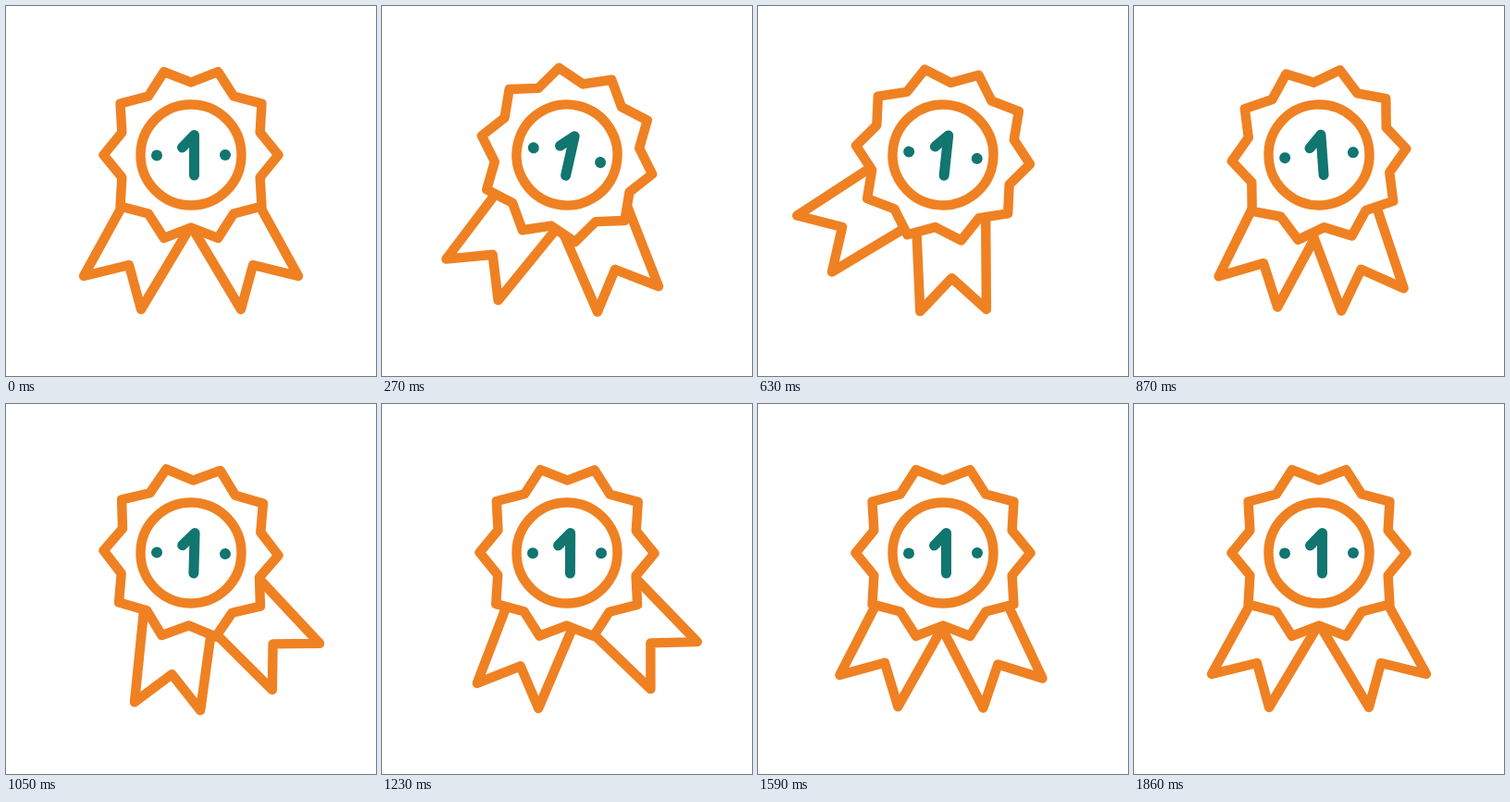
Recreate the animation shown at these times as an HTML page. Size 400 by 400 pixels, loop 2.93 s.

```html
<!DOCTYPE html>
<html lang="en">
<head>
<meta charset="utf-8">
<title>First place rosette</title>
<style>
  html, body { margin: 0; width: 100%; height: 100%; overflow: hidden; background: #fff; }
  svg { display: block; width: 100%; height: 100%; }
</style>
</head>
<body>
<svg viewBox="0 0 400 400">
  <g fill="#fff" stroke="#ef8122" stroke-width="10.400" stroke-linecap="round" stroke-linejoin="round">
    <path id="left" d="M145 181L84 292L133 280L146 328L207 226"/>
    <path id="right" d="M255 181L316 292L267 280L254 328L193 226"/>
    <g id="badge">
      <path id="star"/>
      <circle cx="200" cy="161" r="54.5"/>
      <path d="M190.500 153L203.500 139.500V183" fill="none" stroke="#117570" stroke-width="11"/>
      <g fill="#117570" stroke="none">
        <circle cx="163" cy="161.500" r="6"/>
        <circle cx="237" cy="161" r="6"/>
      </g>
    </g>
  </g>
</svg>
<script>
const LOOP = 2930, STEP = 30, REST = 1860;
const CX = 200, CY = 161;
const $ = id => document.getElementById(id);

// A pendulum: cosine easing from one turning point [time, degrees] to the next.
const swing = (...turns) => t => {
  const i = turns.findIndex(([time]) => time > t);
  if (i < 0) return turns[turns.length - 1][1];
  const [t0, a0] = i ? turns[i - 1] : [0, 0];
  const [t1, a1] = turns[i];
  return a0 + (a1 - a0) * (1 - Math.cos(Math.PI * (t - t0) / (t1 - t0))) / 2;
};

const spin = swing([390, 16.2], [870, -4.1], [1060, 1.6], [1300, 0]);
const leftSwing = swing([60, -1.7], [600, 28.6], [1080, -23.5], [1380, 7.7], [1630, -2.2], [REST, 0]);
const rightSwing = swing([30, -2.2], [665, 28.6], [1145, -18.7], [1480, 4.4], [REST, 0]);

function starPath() {
  const points = Array.from({ length: 20 }, (_, i) => {
    const r = i % 2 ? 78.5 : 94.5, a = i * Math.PI / 10;
    return `${CX + r * Math.cos(a)} ${CY + r * Math.sin(a)}`;
  });
  return `M${points.join("L")}Z`;
}

// A ribbon swings below the badge centre and is drawn in a little as it passes the middle.
function drawRibbon(id, side, angle, t) {
  const pull = 5 * Math.sin(Math.PI * Math.min(t / REST, 1)) * Math.cos(angle / 22);
  $(id).setAttribute("transform",
    `rotate(${angle} ${CX + side * 8} ${CY + 13}) translate(${-side * pull * .5} ${-pull * .87})`);
}

function draw(t) {
  $("badge").setAttribute("transform", `rotate(${spin(t)} ${CX} ${CY})`);
  drawRibbon("left", -1, leftSwing(t), t);
  drawRibbon("right", 1, rightSwing(t), t);
}

$("star").setAttribute("d", starPath());
const start = performance.now();
function tick() {
  const t = (performance.now() - start) % LOOP;
  draw(Math.floor(t / STEP) * STEP);
  requestAnimationFrame(tick);
}
tick();
</script>
</body>
</html>
```
